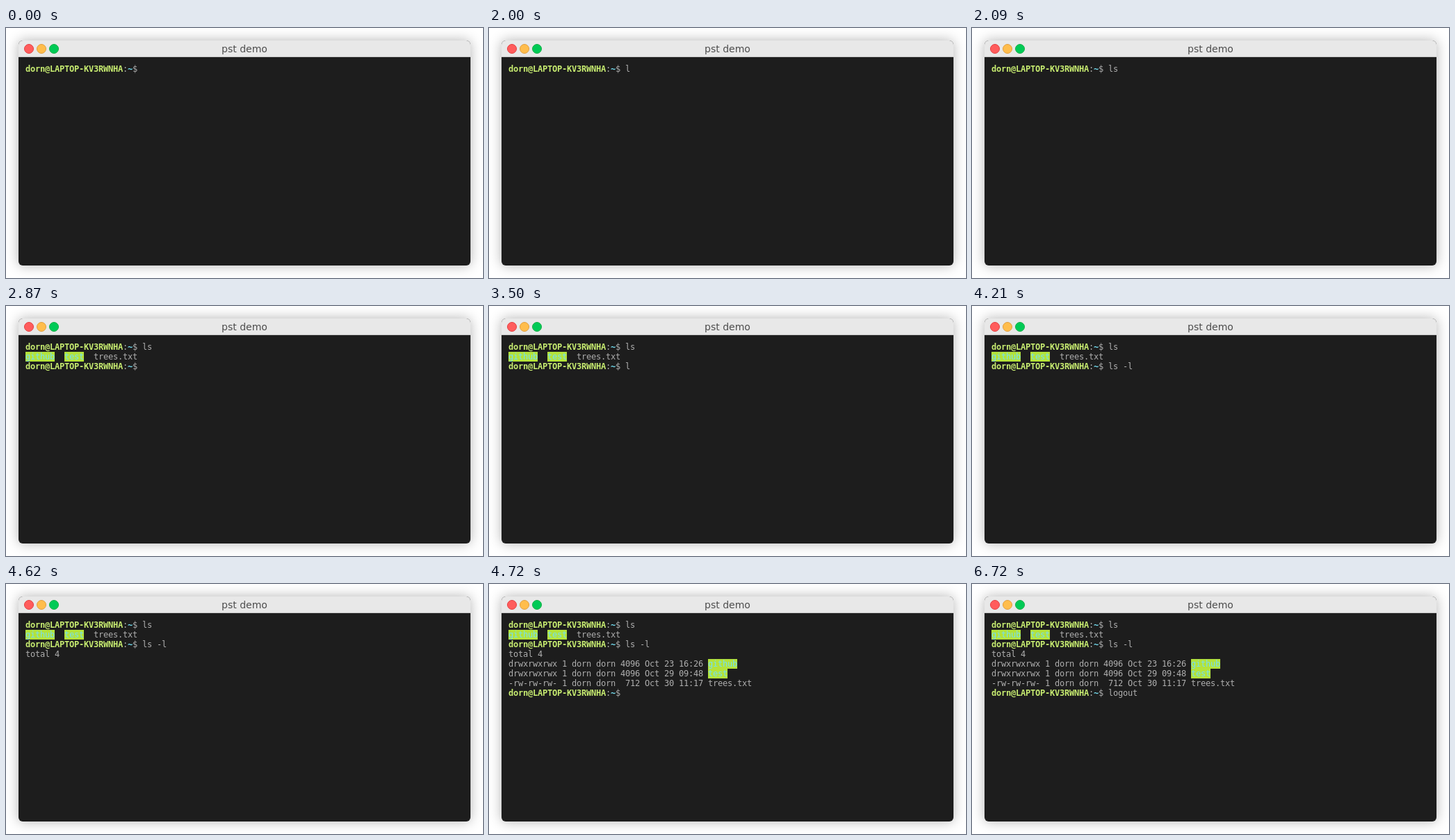
Recreate the animation shown at these times as an HTML page. Size 686 by 360 pixels, loop 8.62 s.

```html
<!DOCTYPE html>
<html lang="en">
<head>
<meta charset="utf-8">
<title>pst demo</title>
<style>
  html, body {
    margin: 0;
    width: 100%;
    height: 100%;
    overflow: hidden;
    background: #fff;
  }
  .window {
    position: absolute;
    left: 18px;
    top: 18px;
    width: 650px;
    height: 324px;
    border-radius: 6px;
    background: #1d1d1d;
    box-shadow: 0 0 18px rgba(0, 0, 0, .3);
    overflow: hidden;
  }
  .bar {
    box-sizing: border-box;
    height: 24px;
    border-bottom: 1px solid #c8c8c8;
    background: #e8e8e8;
    color: #4d4d4d;
    font: 14px/24px "DejaVu Sans", sans-serif;
    text-align: center;
  }
  .bar i {
    position: absolute;
    top: 5px;
    box-sizing: border-box;
    width: 14px;
    height: 14px;
    border: 1px solid;
    border-radius: 50%;
  }
  .close { left: 8px; background: #ff5c5c; border-color: #e33e41 !important; }
  .mini  { left: 26px; background: #ffbd4c; border-color: #e09e3e !important; }
  .zoom  { left: 44px; background: #00ca56; border-color: #14ae46 !important; }

  /* terminal cells are 7 x 14 px */
  pre {
    position: absolute;
    left: 10px;
    top: 34px;
    margin: 0;
    color: #afafaf;
    font: 12px/14px "DejaVu Sans Mono", monospace;
    letter-spacing: calc(7px - 1ch);
  }
  b { color: #c8ed71; }
  .home, .dir { color: #75dff2; }
  .dir {
    display: inline-block;
    height: 14px;
    background: #b3e33b;
    vertical-align: top;
  }

  /* everything typed or printed appears at once and stays until the loop ends */
  .at { animation: 8620ms step-end infinite; }
  .l1     { animation-name: l1; }
  .s1     { animation-name: s1; }
  .list   { animation-name: list; }
  .l2     { animation-name: l2; }
  .s2     { animation-name: s2; }
  .dash   { animation-name: dash; }
  .flag   { animation-name: flag; }
  .total  { animation-name: total; }
  .rows   { animation-name: rows; }
  .logout { animation-name: logout; }
  @keyframes l1     { 0% { opacity: 0 } 23.2%, 100% { opacity: 1 } }
  @keyframes s1     { 0% { opacity: 0 } 24.244%, 100% { opacity: 1 } }
  @keyframes list   { 0% { opacity: 0 } 33.294%, 100% { opacity: 1 } }
  @keyframes l2     { 0% { opacity: 0 } 40.602%, 100% { opacity: 1 } }
  @keyframes s2     { 0% { opacity: 0 } 41.878%, 100% { opacity: 1 } }
  @keyframes dash   { 0% { opacity: 0 } 46.751%, 100% { opacity: 1 } }
  @keyframes flag   { 0% { opacity: 0 } 48.838%, 100% { opacity: 1 } }
  @keyframes total  { 0% { opacity: 0 } 53.595%, 100% { opacity: 1 } }
  @keyframes rows   { 0% { opacity: 0 } 54.755%, 100% { opacity: 1 } }
  @keyframes logout { 0% { opacity: 0 } 77.957%, 100% { opacity: 1 } }
</style>
</head>
<body>
<div class="window">
  <div class="bar"><i class="close"></i><i class="mini"></i><i class="zoom"></i>pst demo</div>
<pre><b>dorn@LAPTOP-KV3RWNHA</b>:<b class="home">~</b>$ <span class="at l1">l</span><span class="at s1">s</span>
<span class="at list"><span class="dir">github</span>  <span class="dir">test</span>  trees.txt
<b>dorn@LAPTOP-KV3RWNHA</b>:<b class="home">~</b>$ </span><span class="at l2">l</span><span class="at s2">s</span><span class="at dash"> -</span><span class="at flag">l</span>
<span class="at total">total 4</span>
<span class="at rows">drwxrwxrwx 1 dorn dorn 4096 Oct 23 16:26 <span class="dir">github</span>
drwxrwxrwx 1 dorn dorn 4096 Oct 29 09:48 <span class="dir">test</span>
-rw-rw-rw- 1 dorn dorn  712 Oct 30 11:17 trees.txt
<b>dorn@LAPTOP-KV3RWNHA</b>:<b class="home">~</b>$ </span><span class="at logout">logout</span></pre>
</div>
</body>
</html>
```
